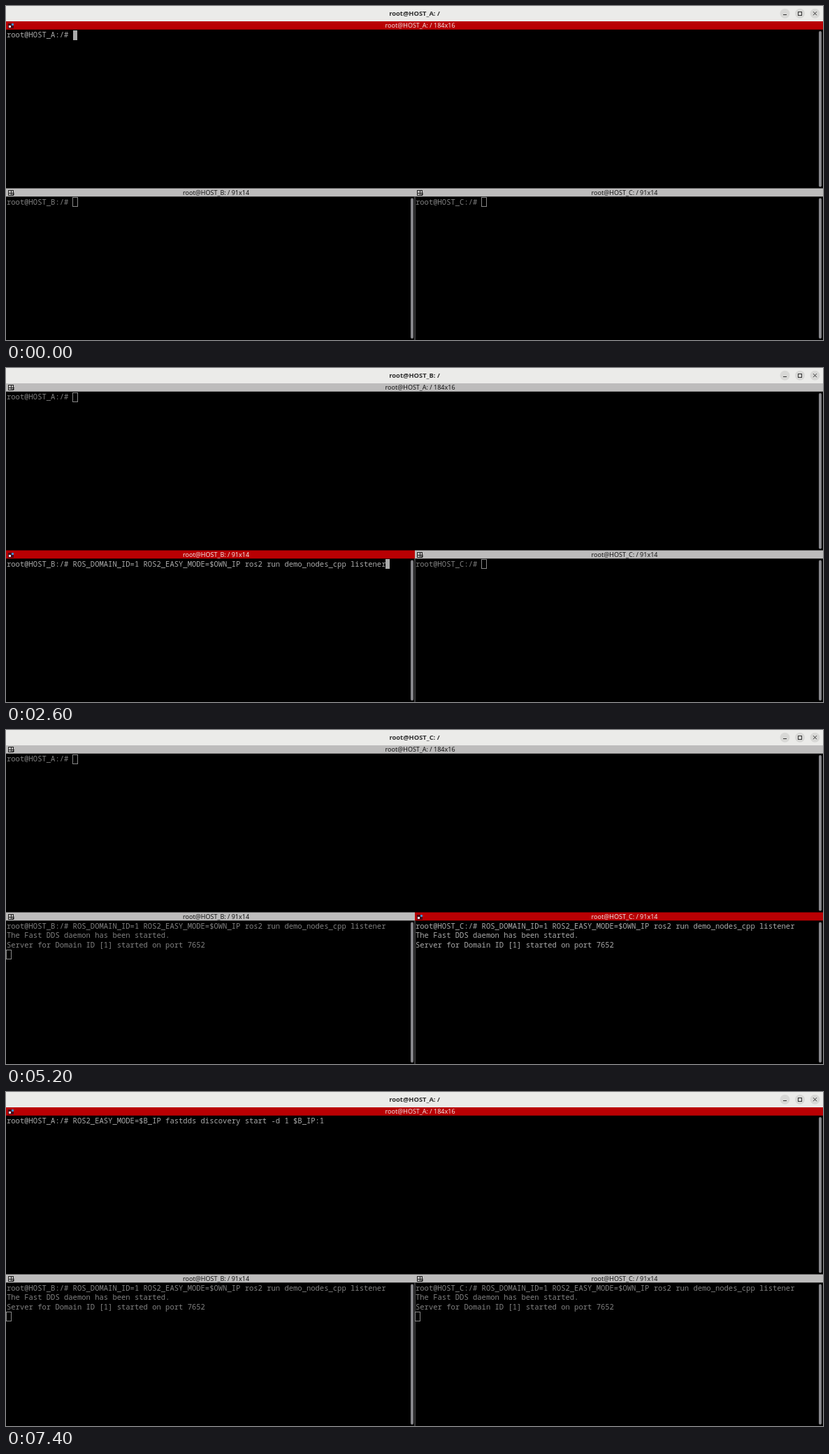
These frames come from a looping animation (1169x479 px, 8000 ms). An HTML page with a canvas:

```html
<!DOCTYPE html>
<html lang="en">
<head>
<meta charset="utf-8">
<title>Three terminals</title>
<style>
  html, body { margin: 0; width: 100%; height: 100%; overflow: hidden; background: #000; }
  canvas { display: block; }
</style>
</head>
<body>
<canvas id="stage" width="1169" height="479"></canvas>
<script>
const ctx = document.getElementById('stage').getContext('2d');
const LOOP = 8000, BLINK = 600, CELL = 6.308, LINE = 13.7;

const LISTEN = 'ROS_DOMAIN_ID=1 ROS2_EASY_MODE=$OWN_IP ros2 run demo_nodes_cpp listener';
const SERVE = 'ROS2_EASY_MODE=$B_IP fastdds discovery start -d 1 $B_IP:1';
const OUTPUT = ['The Fast DDS daemon has been started.', 'Server for Domain ID [1] started on port 7652'];

// Times in ms: command pasted, Enter pressed, output printed.
const panes = [
  { host: 'HOST_A', size: '184x16', x: 0, y: 22, w: 1169, h: 239.5, command: SERVE, paste: 6800, enter: Infinity, print: Infinity },
  { host: 'HOST_B', size: '91x14', x: 0, y: 261.5, w: 585, h: 217.5, command: LISTEN, paste: 1400, enter: 3200, print: 3400 },
  { host: 'HOST_C', size: '91x14', x: 585, y: 261.5, w: 584, h: 217.5, command: LISTEN, paste: 4400, enter: 4600, print: 4800 },
];
const focusChanges = [[0, 0], [600, 1], [3800, 2], [5600, 0]];

function rect(x, y, w, h, color) {
  ctx.fillStyle = color;
  ctx.fillRect(x, y, w, h);
}

function outline(x, y, w, h, color) {
  ctx.strokeStyle = color;
  ctx.lineWidth = 1;
  ctx.strokeRect(x, y, w, h);
}

function path(points, color) {
  ctx.beginPath();
  for (const [x1, y1, x2, y2] of points) {
    ctx.moveTo(x1, y1);
    ctx.lineTo(x2, y2);
  }
  ctx.strokeStyle = color;
  ctx.lineWidth = 1;
  ctx.stroke();
}

function label(text, x, y, font, color) {
  ctx.font = font;
  ctx.textAlign = 'center';
  ctx.fillStyle = color;
  ctx.fillText(text, x, y);
}

function gridText(text, x, y, color) {
  ctx.font = '10.5px "Noto Sans Mono", monospace';
  ctx.textAlign = 'left';
  ctx.fillStyle = color;
  [...text].forEach((char, i) => ctx.fillText(char, x + i * CELL, y));
}

function drawWindowBar(host) {
  rect(0, 0, 1169, 22, '#ebebe9');
  label(`root@${host}: /`, 584.5, 14, 'bold 9.4px "Noto Sans", sans-serif', '#2e2e2e');
  for (const x of [1114.5, 1136, 1157.5]) {
    ctx.beginPath();
    ctx.arc(x, 10.7, 7, 0, 2 * Math.PI);
    ctx.fillStyle = '#d8d8d6';
    ctx.fill();
  }
  path([[1112, 12.5, 1117, 12.5]], '#333');
  outline(1133.5, 8.5, 5, 5, '#333');
  path([[1155, 8.2, 1160, 13.2], [1160, 8.2, 1155, 13.2]], '#333');
}

function drawIcon(x, y, focused) {
  if (focused) {
    rect(x + 3, y + 3, 8, 7, '#4a0a18');
    rect(x + 4, y + 6, 3, 3, '#eee');
    rect(x + 8, y + 3, 3, 3, '#3d8fd0');
  } else {
    outline(x + 3.5, y + 2.5, 7, 7, '#222');
    path([[x + 7.5, y + 2, x + 7.5, y + 10], [x + 3, y + 6.5, x + 12, y + 6.5], [x + 9, y + 8.5, x + 12, y + 8.5]], '#222');
  }
}

function drawPane(pane, focused, cursorOn, t) {
  const { x, y, w, h } = pane;
  rect(x, y, w, 11.8, focused ? '#b90003' : '#bdbcbc');
  drawIcon(x, Math.round(y), focused);
  label(`root@${pane.host}: / ${pane.size}`, x + w / 2 + (x || y > 30 ? 8 : 8), y + 9.2,
    '9px "Noto Sans", sans-serif', focused ? '#f0e4e4' : '#161616');

  ctx.beginPath();
  ctx.roundRect(x + w - 6, y + 14, 4, h - 16, 2);
  ctx.fillStyle = '#85858a';
  ctx.fill();

  const lines = [`root@${pane.host}:/# ` + (t >= pane.paste ? pane.command : '')];
  if (t >= pane.print) lines.push(...OUTPUT);
  if (t >= pane.enter) lines.push('');
  const left = x + 1, top = y + 12.8;
  lines.forEach((line, i) => gridText(line, left, top + 10.4 + i * LINE, focused ? '#aaa' : '#808080'));

  const row = lines.length - 1;
  const cursorX = Math.round(left + lines[row].length * CELL);
  const cursorY = Math.round(top + row * LINE);
  if (!focused) outline(cursorX - 0.5, cursorY + 0.5, 7, 13, '#888');
  else if (cursorOn) rect(cursorX, cursorY, 6, 14, '#aaa');
}

function draw(t) {
  const active = focusChanges.filter(([time]) => time <= t).pop();
  const pane = panes[active[1]];
  // Focus and every key press restart the blink.
  const restart = Math.max(active[0], ...[pane.paste, pane.enter].filter(time => time <= t));
  const cursorOn = Math.floor((t - restart) / BLINK) % 2 === 0;

  rect(0, 0, 1169, 479, '#000');
  drawWindowBar(pane.host);
  panes.forEach(p => drawPane(p, p === pane, cursorOn, t));
  rect(584.5, 273.3, 1, 206, '#77777a');
}

function frame(now) {
  draw(now % LOOP);
  requestAnimationFrame(frame);
}
requestAnimationFrame(frame);
</script>
</body>
</html>
```
